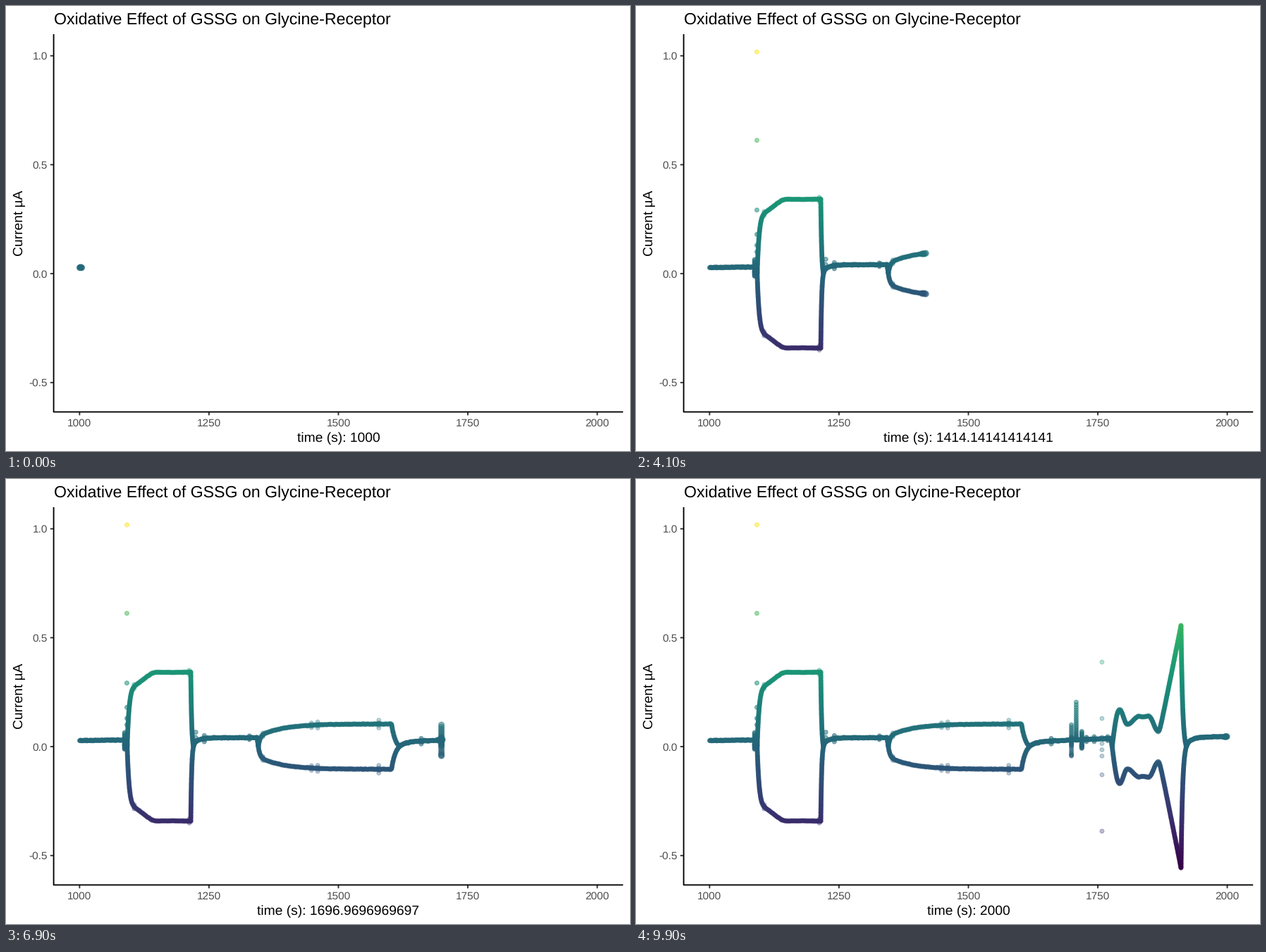
Recreate the animation shown at these times as a matplotlib script. Size 885 px wide and 632 px high, loop 10 s.

```python
import matplotlib.pyplot as plt
import numpy as np
from matplotlib.animation import FuncAnimation

W, H, DPI = 885, 632, 100
PT = 72 / DPI
FRAMES = 100
LEFT, RIGHT, TOP, BOTTOM = 67.6, 875.2, 40, 576.5
V_MIN, V_MAX = -0.556, 1.02

plt.rcParams["font.family"] = "Liberation Sans"
plt.rcParams["text.hinting"] = "none"


def px(t):
    return 104.34 + (np.asarray(t) - 1000) * 0.7342


def py(v):
    return 380.1 - np.asarray(v) * 309.4


def decay(dt, tau):
    return np.exp(-dt / tau)


def smooth(u):
    u = np.clip(u, 0, 1)
    return u * u * (3 - 2 * u)


def wash(dt, base, start, share, fast, slow):
    """Return to the baseline with a fast and a slow component."""
    return base + (start - base) * (share * decay(dt, fast)
                                    + (1 - share) * decay(dt, slow))


def wobble(t):
    """Third dose: eased swings between turning points, then a steady ramp."""
    turns = [(1792, -.17), (1807, -.102), (1830, -.14), (1838, -.136),
             (1848, -.141), (1867, -.07)]
    v = .034 - .204 * np.sin(np.pi / 2 * np.clip((t - 1776) / 16, 0, 1))
    for (t0, v0), (t1, v1) in zip(turns, turns[1:]):
        v += (v1 - v0) * smooth((t - t0) / (t1 - t0))
    ramp = np.hypot(np.maximum(t - 1867, 0), 3) - 3
    return v - .0119 * ramp


def current(t):
    """Membrane current, phase by phase."""
    phases = [
        (1000, lambda t: .028 + 3e-5 * (t - 1000)),
        (1091.5, lambda t: .031 - .316 * (1 - decay(t - 1091.5, 4))
            - .056 * smooth((t - 1103) / 45)),
        (1214.8, lambda t: wash(t - 1214.8, .041, -.341, .9, 1.7, 12)),
        (1343.5, lambda t: -.104 + .086 * decay(t - 1343.5, 3)
            + .06 * decay(t - 1343.5, 45)),
        (1602.5, lambda t: wash(t - 1602.5, .028, -.104, .85, 8, 30)
            + 8e-5 * np.maximum(t - 1660, 0)),
        (1776, wobble),
        (1910.7, lambda t: wash(t - 1910.7, .046, -.556, .9, 3, 14)),
    ]
    v = np.zeros_like(t)
    for start, f in phases:
        v[t >= start] = f(t[t >= start])
    return v


def build_points():
    rng = np.random.default_rng(4)
    grid = np.linspace(1000, 2000, 20001)
    cur = current(grid)

    # Even spacing along the curve keeps steep parts solid
    arc = np.cumsum(np.hypot(np.gradient(px(grid)), np.gradient(py(cur))))
    at = np.arange(arc[0], arc[-1], 0.65)
    t = np.interp(at, arc, grid)
    v = np.interp(at, arc, cur) + rng.normal(0, 0.001, at.size)

    ts, vs = [t], [v]

    def add(when, values):
        ts.append(np.full(len(values), when))
        vs.append(np.asarray(values))

    # Small glitches on the curve
    for when in (1105.5, 1212, 1241, 1328, 1354, 1448, 1460, 1578,
                 1660, 1728, 1743, 1769):
        size = rng.uniform(.008, .018)
        add(when, np.interp(when, grid, cur) + np.linspace(-size, size, 4))
    # Vertical bursts, thinning out towards the far end
    for when, near, far in ((1087, -.012, .065), (1699, -.043, .1),
                            (1708.3, .03, .204), (1719, -.008, .07)):
        add(when, near + (far - near) * np.linspace(0, 1, 24) ** 1.6)
    # Switching pulses
    add(1091.4, [1.018, .612, .292, .18, .13, .1])
    add(1224.5, [.066, .042])
    add(1758, -.388 / 3.0 ** np.arange(4))

    # The signed current and its magnitude are both plotted
    t, v = np.concatenate(ts), np.concatenate(vs)
    t, v = np.tile(t, 2), np.concatenate([v, np.abs(v)])
    order = np.argsort(t, kind="stable")
    return t[order], v[order]


def shade(v):
    n = np.clip((v - V_MIN) / (V_MAX - V_MIN), 0, 1)
    rgba = plt.get_cmap("viridis")(n)
    rgba[:, :3] *= 1 - np.outer(1 - n ** 4, [0.2, 0.08, 0.15])
    rgba[:, 3] = 0.3
    return rgba


t, v = build_points()
xy = np.column_stack([px(t), py(v)])
colors = shade(v)
bins = np.rint((t - 1000) / 1000 * (FRAMES - 1)).astype(int)

fig = plt.figure(figsize=(W / DPI, H / DPI), dpi=DPI, facecolor="white")
ax = fig.add_axes([0, 0, 1, 1])
ax.set_xlim(0, W)
ax.set_ylim(H, 0)
ax.axis("off")


def label(x, y, text, size, color="black", **kw):
    return ax.text(x, y, text, fontsize=size * PT, color=color,
                   va="baseline", **kw)


def line(xs, ys, color):
    ax.plot(xs, ys, color=color, lw=1.87 * PT, solid_capstyle="butt",
            snap=False, zorder=5)


for tick in (1000, 1250, 1500, 1750, 2000):
    line([px(tick)] * 2, [BOTTOM, BOTTOM + 4.83], "#333333")
    label(px(tick), 596.5, str(tick), 15.45, "#4d4d4d", ha="center")
for tick in (-0.5, 0.0, 0.5, 1.0):
    line([LEFT - 4.83, LEFT], [py(tick)] * 2, "#333333")
    label(58.9, py(tick) + 5.5, f"{tick:.1f}", 15.45, "#4d4d4d", ha="right")
line([LEFT, LEFT, RIGHT], [TOP, BOTTOM, BOTTOM], "black")

label(LEFT, 26.5, "Oxidative Effect of GSSG on Glycine-Receptor", 23.17)
label(23.7, (TOP + BOTTOM) / 2, "Current µA", 19.3, ha="center",
      rotation=90, rotation_mode="anchor")
clock = label((LEFT + RIGHT) / 2, 619, "", 19.3, ha="center")


def dots(radius, z):
    return ax.scatter([], [], s=(2 * radius * PT) ** 2, lw=1.24 * PT, zorder=z)


trail = dots(2.85, 2)
head = dots(3.9, 3)


def show(group, start, stop):
    group.set_visible(stop > start)
    if stop > start:
        group.set_offsets(xy[start:stop])
        group.set_facecolor(colors[start:stop])
        group.set_edgecolor(colors[start:stop])


def update(i):
    start, stop = np.searchsorted(bins, [i, i + 1])
    show(trail, 0, start)
    show(head, start, stop)
    clock.set_text(f"time (s): {1000 + 1000 * i / (FRAMES - 1):.15g}")
    return trail, head, clock


anim = FuncAnimation(fig, update, frames=FRAMES, interval=100, repeat=True)
plt.show()
```
